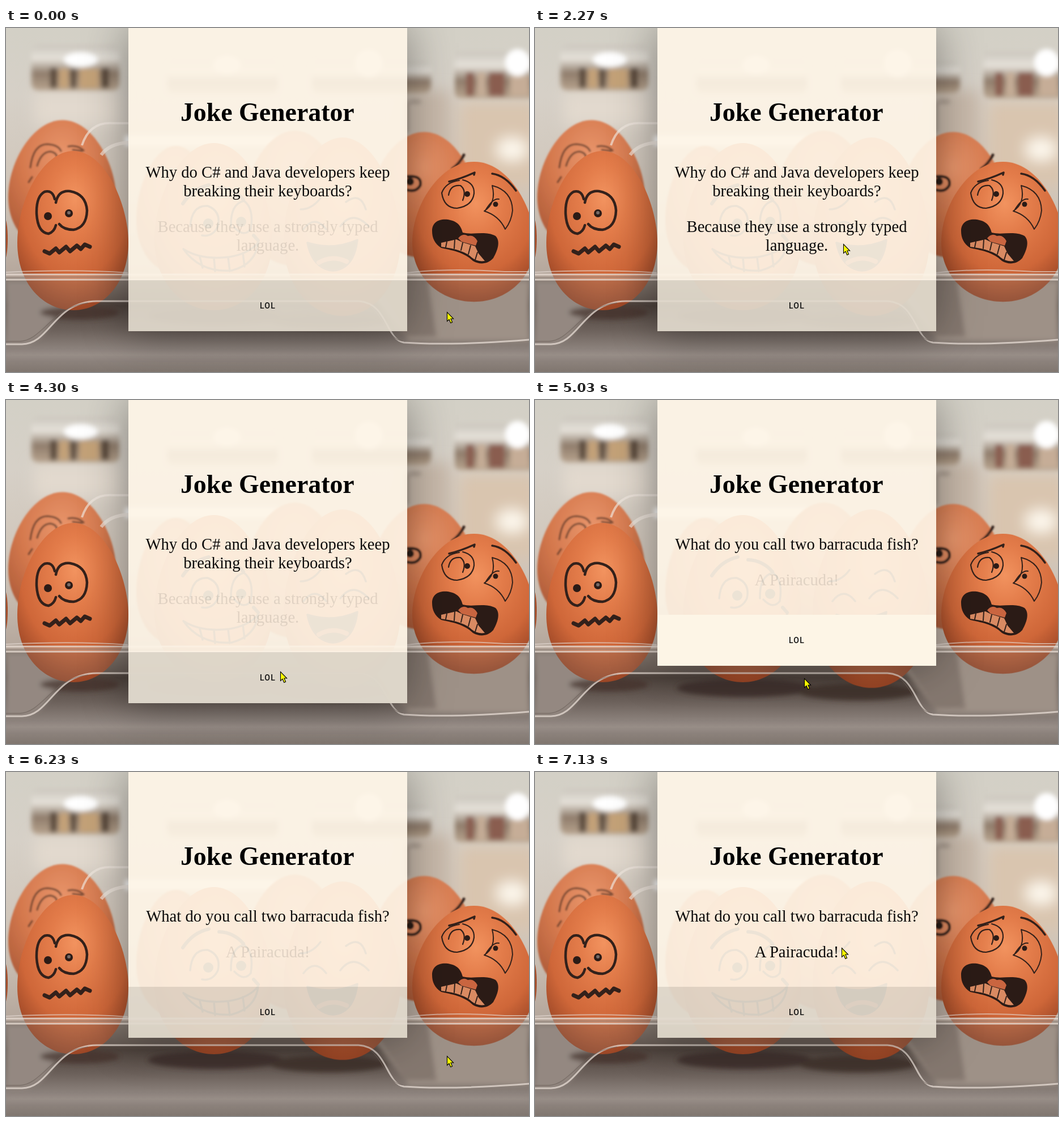
An HTML page for the animation above (8000 ms loop, 923 px wide and 607 px high).

```html
<!DOCTYPE html>
<html lang="en">
<head>
<meta charset="utf-8">
<title>Joke Generator</title>
<style>
html, body { margin: 0; width: 100%; height: 100%; overflow: hidden; background: #d5d0c8; }
svg, #card { position: absolute; left: 0; top: 0; }
#card { left: 216px; width: 492px; background: rgba(253, 245, 230, .92); box-shadow: 0 0 75px rgba(0, 0, 0, .4); }
#bar { position: absolute; bottom: 0; width: 100%; height: 89.5px; }
.serif { font: 28.65px "Liberation Serif", "Times New Roman", serif; fill: #0b0b0b; text-anchor: middle; }
.title { font-size: 45.85px; font-weight: bold; fill: #000; }
.lol { font: 500 14px Roboto, Arial, sans-serif; letter-spacing: 1.2px; fill: #111; text-anchor: middle; }
.ink { fill: none; stroke: #33211b; stroke-width: 3.5; stroke-linecap: round; stroke-linejoin: round; }
.dot { fill: #2b1b16; stroke: none; }
</style>
</head>
<body>
<svg width="923" height="607" viewBox="0 0 923 607">
  <defs>
    <linearGradient id="wall" x2="0" y2="1">
      <stop offset="0" stop-color="#d3d0c6"/><stop offset=".2" stop-color="#d6d0c7"/>
      <stop offset=".5" stop-color="#cfc4b8"/><stop offset=".73" stop-color="#b3a59a"/>
    </linearGradient>
    <linearGradient id="shelf" x2="0" y2="1">
      <stop offset="0" stop-color="#83786f"/><stop offset=".3" stop-color="#4d423c"/>
      <stop offset=".55" stop-color="#6b605a"/><stop offset=".75" stop-color="#8b817b"/>
      <stop offset=".82" stop-color="#938983"/><stop offset="1" stop-color="#80766f"/>
    </linearGradient>
    <linearGradient id="lid" x2="0" y2="1">
      <stop offset="0" stop-color="#cbc6bd"/><stop offset=".3" stop-color="#e6e2da"/>
      <stop offset=".48" stop-color="#b5a99c"/><stop offset=".62" stop-color="#8f7c6b"/>
      <stop offset="1" stop-color="#b8a48e"/>
    </linearGradient>
    <radialGradient id="shell" cx=".52" cy=".3" r=".72">
      <stop offset="0" stop-color="#f2935f"/><stop offset=".3" stop-color="#e37c4a"/>
      <stop offset=".68" stop-color="#cf6739"/><stop offset="1" stop-color="#964324"/>
    </radialGradient>
    <radialGradient id="far" cx=".5" cy=".28" r=".75">
      <stop offset="0" stop-color="#e9966c"/><stop offset=".5" stop-color="#d5794e"/>
      <stop offset="1" stop-color="#a95836"/>
    </radialGradient>
    <filter id="soft" x="-30%" y="-30%" width="160%" height="160%"><feGaussianBlur stdDeviation="4"/></filter>
    <filter id="haze" x="-60%" y="-60%" width="220%" height="220%"><feGaussianBlur stdDeviation="13"/></filter>
    <filter id="edge"><feGaussianBlur stdDeviation="1.5"/></filter>
    <path id="egg" d="M0-140C56-140 98-46 98 22C98 94 52 141 0 141C-54 141-100 94-100 22C-100-54-54-140 0-140Z"/>
  </defs>

  <rect width="923" height="607" fill="url(#wall)"/>
  <g filter="url(#haze)">
    <rect x="700" y="110" width="85" height="170" fill="#c9baab"/>
    <rect x="800" y="130" width="140" height="150" fill="#d9c5af"/>
    <rect x="50" y="112" width="150" height="60" fill="#e2d9ce"/>
    <ellipse cx="893" cy="214" rx="28" ry="20" fill="#fffaf0"/>
  </g>
  <g filter="url(#soft)">
    <rect x="45" y="30" width="155" height="80" rx="12" fill="url(#lid)"/>
    <path d="M78 70h12v36H78zM114 72h10v34h-10zM168 70h14v36h-14z" fill="#5a483b"/>
    <path d="M94 72h16v34H94zM130 72h34v34h-34z" fill="#c4a278"/>
    <ellipse cx="132" cy="56" rx="30" ry="13" fill="#fff"/>
    <rect x="285" y="60" width="195" height="55" rx="12" fill="url(#lid)"/>
    <rect x="540" y="60" width="210" height="55" rx="12" fill="url(#lid)"/>
    <ellipse cx="390" cy="65" rx="24" ry="16" fill="#fff"/>
    <ellipse cx="640" cy="62" rx="24" ry="24" fill="#fff"/>
    <rect x="792" y="42" width="150" height="82" rx="10" fill="url(#lid)"/>
    <path d="M812 78h14v42h-14zM852 78h28v42h-28z" fill="#8a5d4f"/>
    <path d="M832 78h14v42h-14zM890 84h33v36h-33z" fill="#c6ad97"/>
    <ellipse cx="903" cy="61" rx="22" ry="24" fill="#fff"/>
    <path d="M210 190H480V208H210z" fill="#fff"/>
    <path d="M708 130v55M712 130h20" stroke="#8d8076" stroke-width="4"/>
  </g>

  <rect y="440" width="923" height="167" fill="url(#shelf)"/>
  <g filter="url(#soft)">
    <path d="M0 446H140L60 545L35 558H0z" fill="#978c85"/>
    <path d="M630 446H923V552H710z" fill="#a5988d"/>
    <path d="M640 446H745L760 545H705z" fill="#83766d"/>
    <ellipse cx="130" cy="502" rx="70" ry="12" fill="#4a3831"/>
    <ellipse cx="370" cy="508" rx="120" ry="16" fill="#41332d"/>
    <ellipse cx="570" cy="515" rx="105" ry="15" fill="#43342e"/>
    <path d="M0 577H923" stroke="#a0968f" stroke-width="3"/>
  </g>

  <g filter="url(#edge)">
    <use href="#egg" transform="translate(300 320) scale(.7 .8)" fill="url(#far)"/>
    <use href="#egg" transform="translate(510 300) scale(.9 .85)" fill="url(#far)"/>
    <use href="#egg" transform="translate(100 280) scale(.96 .84)" fill="url(#far)"/>
    <use href="#egg" transform="translate(738 294) scale(.95 .79)" fill="url(#far)"/>
    <g class="ink" opacity=".55">
      <path d="M43 246Q48 205 73 205Q92 206 97 217M55 243Q62 219 78 218Q92 220 90 234M110 209Q126 206 137 216M40 272l6-9M118 215l16 2"/>
    </g>
    <g class="ink"><path d="M788 248Q800 240 808 224M709 262Q735 260 731 278Q724 290 709 286" stroke-width="5"/><circle class="dot" cx="713" cy="271" r="7"/></g>
  </g>
  <ellipse cx="-3" cy="372" rx="6" ry="38" fill="#a34b27"/>
  <g fill="none" stroke="#f1e9e0" stroke-width="4" opacity=".65">
    <path d="M134 207Q148 164 190 168H216"/><path d="M168 224Q182 204 216 202" stroke-width="6"/>
  </g>
  <use href="#egg" transform="translate(119 357) scale(.99 1)" fill="url(#shell)"/>
  <use href="#egg" transform="translate(367 350) scale(1.05)" fill="url(#shell)"/>
  <use href="#egg" transform="translate(594 350) scale(1.04 1.12)" fill="url(#shell)"/>
  <use href="#egg" transform="translate(826 359) scale(1.09 .88)" fill="url(#shell)"/>

  <g class="ink">
    <path d="M86 302Q82 285 68 289Q53 297 54 328Q56 361 75 363Q85 360 88 348M88 308Q92 286 113 288Q141 293 143 322Q142 352 119 356Q102 356 94 346" stroke-width="4.5"/>
    <circle class="dot" cx="74" cy="332" r="7"/><circle class="dot" cx="111" cy="327" r="7"/>
    <circle cx="111" cy="326" r="3" fill="#766b68" stroke="none"/>
    <path d="M68 394L77 398L88 389L94 396L106 386L113 394L125 384L132 390L139 382L148 386" stroke-width="7"/>
  </g>
  <g class="ink">
    <path d="M312 310Q330 283 358 277M376 282Q402 283 419 303M445 375l-8-9" stroke-width="6"/>
    <path d="M325 350Q328 312 356 314Q380 323 374 350Q365 369 346 366M397 350Q396 310 420 305Q438 318 432 355Q420 370 403 352"/>
    <circle class="dot" cx="357" cy="345" r="9"/><circle class="dot" cx="415" cy="342" r="9"/>
    <path d="M313 390Q344 410 394 404Q430 398 445 378Q441 417 398 428Q343 432 313 390M342 404l5 19M367 406l2 23M392 405l3 24M418 397l3 24"/>
    <path d="M532 379Q577 393 620 374Q614 425 577 428Q541 425 532 379Z" fill="#2b1b16"/>
    <path d="M525 355Q545 329 565 355M590 350Q612 320 640 350M520 320Q540 320 555 300M600 307Q625 288 635 320"/>
    <path d="M552 414Q575 400 601 412" stroke="#a64d32" stroke-width="8"/>
  </g>
  <g class="ink">
    <path d="M782 271Q803 266 827 255L826 259M858 257Q881 260 900 287"/>
    <path d="M769 291Q776 272 800 269M806 268Q827 273 826 292Q823 314 796 318Q773 318 769 291M781 295Q784 276 802 278Q813 286 806 304" stroke-width="2.2"/>
    <circle class="dot" cx="814" cy="293" r="5"/>
    <path d="M858 278Q893 287 894 322Q892 341 881 355Q870 331 844 323Q866 309 858 278M846 322Q859 300 870 302" stroke-width="2"/>
    <circle class="dot" cx="864" cy="311" r="4.5"/>
    <path class="dot" d="M752 358C752 342 765 336 780 338C798 341 803 350 806 361C825 366 845 357 864 367C873 376 868 392 860 406C850 417 836 418 824 411C808 395 785 392 768 388C756 380 752 370 752 358Z"/>
    <path d="M768 379L795 373L805 378L828 385L834 398L845 411Q832 413 822 405Q808 391 768 386Z" fill="#d98a62" stroke="none"/>
    <path d="M798 371Q806 361 815 367Q826 364 832 376L829 384L804 377Z" fill="#c96540" stroke="none"/>
    <path d="M778 377l-2 10M792 374l-1 15M806 379l-3 13M820 384l-4 15M832 396l-4 13" stroke-width="2"/>
  </g>

  <path d="M0 445H923V550Q780 562 702 555C675 549 669 484 625 481H160C88 481 75 557 30 558H0Z" fill="#8a7f79" opacity=".26"/>
  <path d="M0 433H923V446H0Z" fill="#cfc0b5" opacity=".4"/>
  <g fill="none" stroke="#e7ddd5">
    <path d="M0 435H923M0 444H923" stroke-width="2.5" opacity=".75"/>
    <path d="M0 439.5H923" stroke="#8a7a70" stroke-width="2" opacity=".5"/>
    <path d="M0 431Q120 425 215 432M708 432Q780 423 880 430H923" stroke-width="2" opacity=".6"/>
    <path d="M0 558H28C78 558 84 483 160 482H622C674 485 669 549 702 555Q790 561 923 550" stroke-width="3" opacity=".75"/>
    <path d="M0 553H24C65 551 82 491 145 485M643 491C667 509 674 550 700 552" stroke="#6d615b" stroke-width="1.5" opacity=".6"/>
  </g>
</svg>

<div id="card"><div id="bar"></div></div>

<svg width="923" height="607" viewBox="0 0 923 607">
  <text class="serif title" x="461.3" y="164">Joke Generator</text>
  <g class="serif" id="first">
    <text x="462" y="264">Why do C# and Java developers keep</text>
    <text x="462" y="297">breaking their keyboards?</text>
    <g class="answer">
      <text x="462" y="360">Because they use a strongly typed</text>
      <text x="462" y="393">language.</text>
    </g>
  </g>
  <g class="serif" id="second">
    <text x="462" y="264">What do you call two barracuda fish?</text>
    <text class="answer" x="462" y="327">A Pairacuda!</text>
  </g>
  <text class="lol" id="lol" x="462">LOL</text>
  <path id="cursor" d="M.5.5V16.5L4 13.2L6.8 19.5L9.6 18.2L6.9 12H11.6Z" fill="#ff0" stroke="#000" stroke-width="1.1"/>
</svg>

<script>
const LOOP = 8000, SWAP = 5030, FADE = 400;
const $ = id => document.getElementById(id);
const answers = document.querySelectorAll('.answer');

// time, x, y of the pointer tip
const track = [
  [0, 778, 501], [1150, 778, 501], [1470, 739, 449], [1830, 621, 414], [2270, 544, 381],
  [3735, 544, 381], [3770, 543, 382], [4080, 508, 445], [4470, 475, 491], [5040, 475, 491],
  [5430, 778, 501], [6225, 778, 501], [6470, 738, 425], [6770, 661, 326], [7130, 541, 310], [LOOP, 541, 310]
];

const slope = (i, k) => (track[i + 1][k] - track[i][k]) / (track[i + 1][0] - track[i][0]);

// tangent that never overshoots a rest position
function tangent(i, k) {
  if (i === 0 || i === track.length - 1) return 0;
  const a = slope(i - 1, k), b = slope(i, k);
  return a * b > 0 ? 2 * a * b / (a + b) : 0;
}

function pointer(t, k) {
  let i = 0;
  while (i < track.length - 2 && t >= track[i + 1][0]) i++;
  const a = track[i], b = track[i + 1], d = b[0] - a[0], u = (t - a[0]) / d, v = 1 - u;
  return v * v * (1 + 2 * u) * a[k] + u * u * (3 - 2 * u) * b[k]
    + d * u * v * (v * tangent(i, k) - u * tangent(i + 1, k));
}

function fade(t, start) {
  const p = Math.min(1, Math.max(0, (t - start) / FADE));
  return 1 - Math.pow(1 - p, 2.3);
}

function draw(t) {
  const swapped = t >= SWAP;
  const height = swapped ? 468.5 : 534.5;
  const reveal = swapped ? fade(t, 6730) : fade(t, 1850) - fade(t, 3930);
  const hover = fade(t, 4070) - fade(t, SWAP + 20);
  const mix = (a, b) => a + (b - a) * hover;

  $('card').style.height = height + 'px';
  $('bar').style.background =
    `rgba(${mix(0, 253)}, ${mix(0, 245)}, ${mix(0, 230)}, ${mix(.1, 1)})`;
  $('first').style.display = swapped ? 'none' : '';
  $('second').style.display = swapped ? '' : 'none';
  answers.forEach(a => a.setAttribute('opacity', .1 + .9 * reveal));
  $('lol').setAttribute('y', height - 39.5);
  $('cursor').setAttribute('transform',
    `translate(${Math.round(pointer(t, 1))} ${Math.round(pointer(t, 2))})`);
}

const begin = performance.now();
function tick() {
  draw((performance.now() - begin) % LOOP);
  requestAnimationFrame(tick);
}
tick();
</script>
</body>
</html>
```
